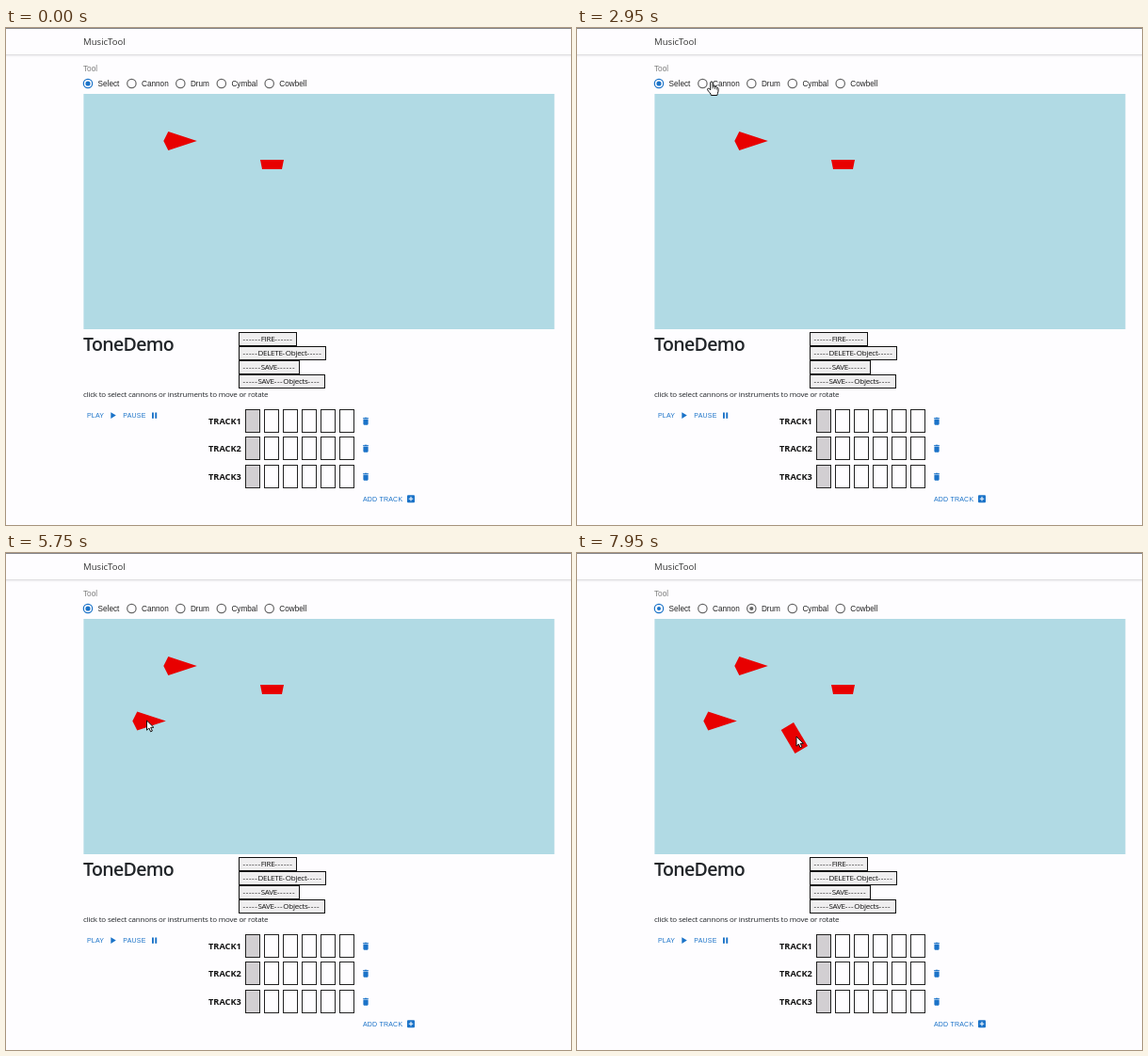
These frames come from a looping animation (600x528 px, 8000 ms). An HTML page with a canvas:

```html
<!DOCTYPE html>
<html lang="en">
<head>
<meta charset="utf-8">
<title>MusicTool</title>
<style>
  html, body { margin: 0; width: 100%; height: 100%; overflow: hidden; background: #fefdff; }
  canvas { display: block; width: 600px; height: 528px; }
</style>
</head>
<body>
<canvas id="stage"></canvas>
<script>
const W = 600, H = 528, LOOP = 8000;
const canvas = document.getElementById('stage');
const ctx = canvas.getContext('2d');
const dpr = window.devicePixelRatio || 1;
canvas.width = W * dpr;
canvas.height = H * dpr;

const PAGE = '#fefdff', BLUE = '#1b73c8', GREY = '#666', RED = '#e80000';
const SANS = '"Liberation Sans", Arial, sans-serif';
const HUMAN = '"Open Sans", "Noto Sans", sans-serif';
const TRASH = new Path2D('M6 19c0 1.1.9 2 2 2h8c1.1 0 2-.9 2-2V7H6v12zM19 4h-3.5l-1-1h-5l-1 1H5v2h14V4z');
const ARROW = new Path2D('M0 0V10.2L2.4 8L4.1 11.8L5.9 11L4.2 7.3H7.4Z');
const HAND = new Path2D('M-1.3 1C-1.3-.4 1.1-.4 1.1 1V5.2C1.8 4.6 3.1 4.8 3.3 5.7C4 5.2 5.1 5.5 5.3 6.3' +
  'C6.1 5.9 7 6.4 7 7.3V10.2C7 12 5.8 12.7 5.8 14.5H-.6C-.6 12.8-3.2 10.8-4.4 8.7C-4.9 7.4-3.5 6.6-2.5 7.6L-1.3 8.8Z');

const TOOLS = [['Select', 87], ['Cannon', 133.4], ['Drum', 185.3], ['Cymbal', 228.8], ['Cowbell', 279.7]];
const CHOICES = [[-1000, 0], [4450, 1], [5500, 0], [6950, 2], [7890, 0]];
const BUTTONS = [
  ['------FIRE------', 61], ['-----DELETE-Object-----', 92],
  ['------SAVE------', 64], ['-----SAVE---Objects----', 91]
];
const POINTER = [
  [50, 11, 12], [850, 158, 61], [1100, 190, 61], [1250, 190, 61], [1500, 242, 60],
  [1900, 302, 58], [2150, 302, 57], [2600, 186, 57], [2950, 143, 57], [3150, 92, 57],
  [3400, 145, 58], [4550, 145, 58], [4750, 146, 71], [5150, 150, 165], [5400, 149.5, 178],
  [6080, 149.5, 178], [6450, 201, 58], [7050, 201, 58], [7650, 233, 195], [8000, 233, 195]
];

const clamp = p => Math.max(0, Math.min(1, p));
const smooth = p => p * p * (3 - 2 * p);

function text(str, x, y, size, color, { font = SANS, weight = 400, spacing = 0 } = {}) {
  ctx.font = `${weight} ${size}px ${font}`;
  ctx.letterSpacing = spacing + 'px';
  ctx.fillStyle = color;
  ctx.fillText(str, x, y);
  return ctx.measureText(str).width;
}

function rect(x, y, w, h, color) {
  ctx.fillStyle = color;
  ctx.fillRect(x, y, w, h);
}

function framed(x, y, w, h, fill, line) {
  rect(x, y, w, h, fill);
  ctx.strokeStyle = line;
  ctx.lineWidth = 1;
  ctx.strokeRect(x + .5, y + .5, w - 1, h - 1);
}

function polygon(points, color, dx = 0, dy = 0) {
  ctx.beginPath();
  points.forEach(([x, y]) => ctx.lineTo(x + dx, y + dy));
  ctx.closePath();
  ctx.fillStyle = color;
  ctx.fill();
}

function cannon(x, y) {
  polygon([[0, 0], [5, -10], [35.5, 0], [5, 10]], RED, x, y);
}

function header() {
  rect(0, 0, W, 1, '#85858a');
  text('MusicTool', 82, 18.2, 9.6, '#333', { font: HUMAN });
  rect(0, 28, W, 1, '#dedde0');
  rect(0, 29, W, 1, '#f3f2f4');
  rect(0, 30, W, 1, '#f9f8fa');
}

function radio(x, on, dot) {
  const color = on ? BLUE : GREY;
  ctx.beginPath();
  ctx.arc(x, 59, 4.7, 0, 7);
  ctx.strokeStyle = color;
  ctx.lineWidth = 1.2;
  ctx.stroke();
  if (dot <= 0) return;
  ctx.beginPath();
  ctx.arc(x, 59, 2.6 * dot, 0, 7);
  ctx.fillStyle = color;
  ctx.fill();
}

function toolbar(t) {
  const step = CHOICES.findLastIndex(c => c[0] <= t);
  const [since, chosen] = CHOICES[step];
  const before = step ? CHOICES[step - 1][1] : -1;
  const p = clamp((t - since) / 150);
  text('Tool', 82, 45.8, 8.2, chosen ? BLUE : '#7c7c7c');
  TOOLS.forEach(([name, x], i) => {
    const dot = i === chosen ? 1 - (1 - p) ** 3 : i === before ? 1 - p ** 1.8 : 0;
    radio(x, i === chosen, dot);
    text(name, x + 10.6, 62, 8.2, '#222');
  });
}

function scene(t) {
  rect(82.4, 70, 500, 250, '#b1dae4');
  cannon(167.3, 120);
  polygon([[270, 140], [295, 140], [293, 150], [272, 150]], RED);
  if (t >= 5500) cannon(134.3, 178.5);
  if (t >= 7890) polygon([[230, 180], [245, 205], [231.5, 213], [216.7, 188]], RED);
}

function buttons() {
  BUTTONS.forEach(([label, w], i) => {
    const y = 323 + i * 15;
    framed(247, y, w + 1, 15, '#efeeef', '#111');
    let x = 251.5;
    for (const run of label.match(/-+|[^-]+/g)) {
      const spacing = run[0] === '-' ? .62 : -.27;
      x += text(run, x, y + 10.4, 8, '#111', { font: HUMAN, spacing });
    }
  });
}

function caps(str, x, y) {
  text(str, x, y, 7, BLUE, { spacing: .2 });
}

function transport() {
  caps('PLAY', 86, 413.7);
  polygon([[111.3, 408.2], [111.3, 415], [116.8, 411.6]], BLUE);
  caps('PAUSE', 124.3, 413.7);
  rect(155, 408.5, 1.9, 6.3, BLUE);
  rect(158.3, 408.5, 1.9, 6.3, BLUE);
}

function tracks() {
  for (let row = 0; row < 3; row++) {
    const y = Math.round(405 + row * 29.4);
    text('TRACK' + (row + 1), 215, y + 16.2, 9.2, '#111', { font: HUMAN, weight: 700 });
    for (let col = 0; col < 6; col++)
      framed(254 + col * 20, y, 16, 25, col ? PAGE : '#d2cfd2', '#222');
    ctx.save();
    ctx.translate(376.8, y + 7.5);
    ctx.scale(.435, .435);
    ctx.fillStyle = BLUE;
    ctx.fill(TRASH);
    ctx.restore();
  }
  caps('ADD TRACK', 379, 502.6);
  ctx.beginPath();
  ctx.roundRect(426, 496.2, 8, 8, 1);
  ctx.fillStyle = BLUE;
  ctx.fill();
  rect(427.7, 499.7, 4.6, 1, '#fff');
  rect(429.5, 497.9, 1, 4.6, '#fff');
}

function pointer(t) {
  if (t < POINTER[0][0]) return;
  const i = Math.min(POINTER.findLastIndex(k => k[0] <= t), POINTER.length - 2);
  const [t0, x0, y0] = POINTER[i], [t1, x1, y1] = POINTER[i + 1];
  const p = smooth(clamp((t - t0) / (t1 - t0)));
  const x = x0 + (x1 - x0) * p, y = y0 + (y1 - y0) * p;
  const overLabel = x > 76 && y > 48 && y < 73;
  ctx.save();
  ctx.translate(x, y);
  ctx.lineJoin = 'round';
  ctx.lineWidth = 1;
  ctx.fillStyle = '#fff';
  ctx.strokeStyle = '#111';
  const shape = overLabel ? HAND : ARROW;
  ctx.fill(shape);
  ctx.stroke(shape);
  if (overLabel) {
    ctx.lineWidth = .7;
    ctx.beginPath();
    for (const [dx, top] of [[1.1, 5.2], [3.3, 5.8], [5.3, 6.4]]) {
      ctx.moveTo(dx, top);
      ctx.lineTo(dx, top + 2.2);
    }
    ctx.stroke();
  }
  ctx.restore();
}

function draw(t) {
  ctx.setTransform(dpr, 0, 0, dpr, 0, 0);
  rect(0, 0, W, H, PAGE);
  header();
  toolbar(t);
  scene(t);
  text('ToneDemo', 82, 343, 19.5, '#212529', { font: HUMAN, weight: 600, spacing: -.65 });
  buttons();
  text('click to select cannons or instruments to move or rotate', 82, 392, 8, '#212529',
    { font: HUMAN, spacing: -.2 });
  transport();
  tracks();
  pointer(t);
}

let start;
function frame(now) {
  start ??= now;
  draw((now - start) % LOOP);
  requestAnimationFrame(frame);
}
requestAnimationFrame(frame);
</script>
</body>
</html>
```
